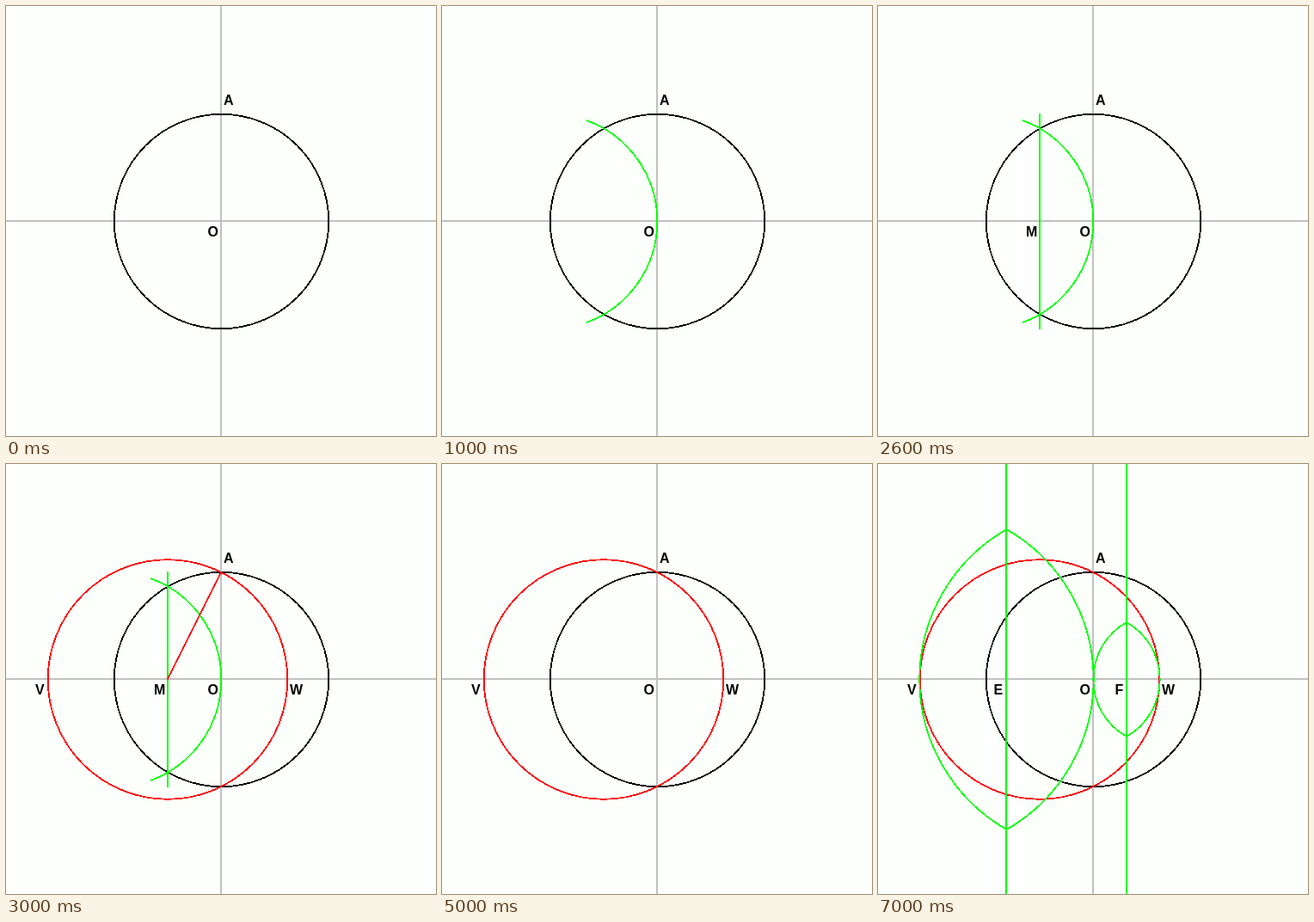
Animation, 500 px wide and 500 px high, one loop 8000 ms. Source, as an HTML page:

```html
<!DOCTYPE html>
<html lang="en">
<head>
<meta charset="utf-8">
<title>Compass construction</title>
<style>
  html, body { margin: 0; height: 100%; overflow: hidden; background: #fdfffc; }
  svg { display: block; width: 100vw; height: 100vh; }
  path, circle { fill: none; stroke-width: 1.8; shape-rendering: crispEdges; }
  .axis { stroke: #c0c0c0; stroke-width: 2; }
  .black { stroke: #000; }
  .green { stroke: #0f0; }
  .red { stroke: #f00; }
  .line { stroke-width: 2; }
  text { font: bold 16px "Liberation Sans", Arial, sans-serif; }
</style>
</head>
<body>
<svg viewBox="0 0 500 500">
  <path class="axis" d="M250 0V500M0 250H500"/>
  <circle class="black" cx="250.5" cy="250.5" r="124.7"/>
  <text x="253" y="115">A</text>
  <text x="234.4" y="268">O</text>

  <!-- midpoint M of the left radius -->
  <path class="green" data-from="1000" data-to="5000" d="M168 133A125 125 0 0 1 168 368"/>
  <g data-from="2000" data-to="5000">
    <path class="green line" d="M188 125V376"/>
    <text x="172" y="268">M</text>
  </g>

  <!-- circle about M through A -->
  <g data-from="3000">
    <circle class="red" cx="188" cy="250.5" r="139.3"/>
    <text x="34" y="268">V</text>
    <text x="330" y="268">W</text>
  </g>
  <path class="red" data-from="3000" data-to="5000" d="M188 250.5L250.5 125.5"/>

  <!-- bisectors of VO and OW -->
  <g data-from="6000">
    <path class="green" d="M149.5 76A201 201 0 0 1 149.5 425A201 201 0 0 1 149.5 76"/>
    <path class="green line" d="M149 0V500"/>
    <text x="134.4" y="268">E</text>
  </g>
  <g data-from="7000">
    <path class="green" d="M289 184A76.5 76.5 0 0 1 289 317A76.5 76.5 0 0 1 289 184"/>
    <path class="green line" d="M289 0V500"/>
    <text x="275.4" y="268">F</text>
  </g>
</svg>
<script>
  const LOOP = 8000;
  const steps = document.querySelectorAll('[data-from]');
  const start = performance.now();

  function draw() {
    const t = (performance.now() - start) % LOOP;
    for (const el of steps) {
      const { from, to = LOOP } = el.dataset;
      el.style.display = t >= +from && t < +to ? '' : 'none';
    }
    requestAnimationFrame(draw);
  }
  draw();
</script>
</body>
</html>
```
